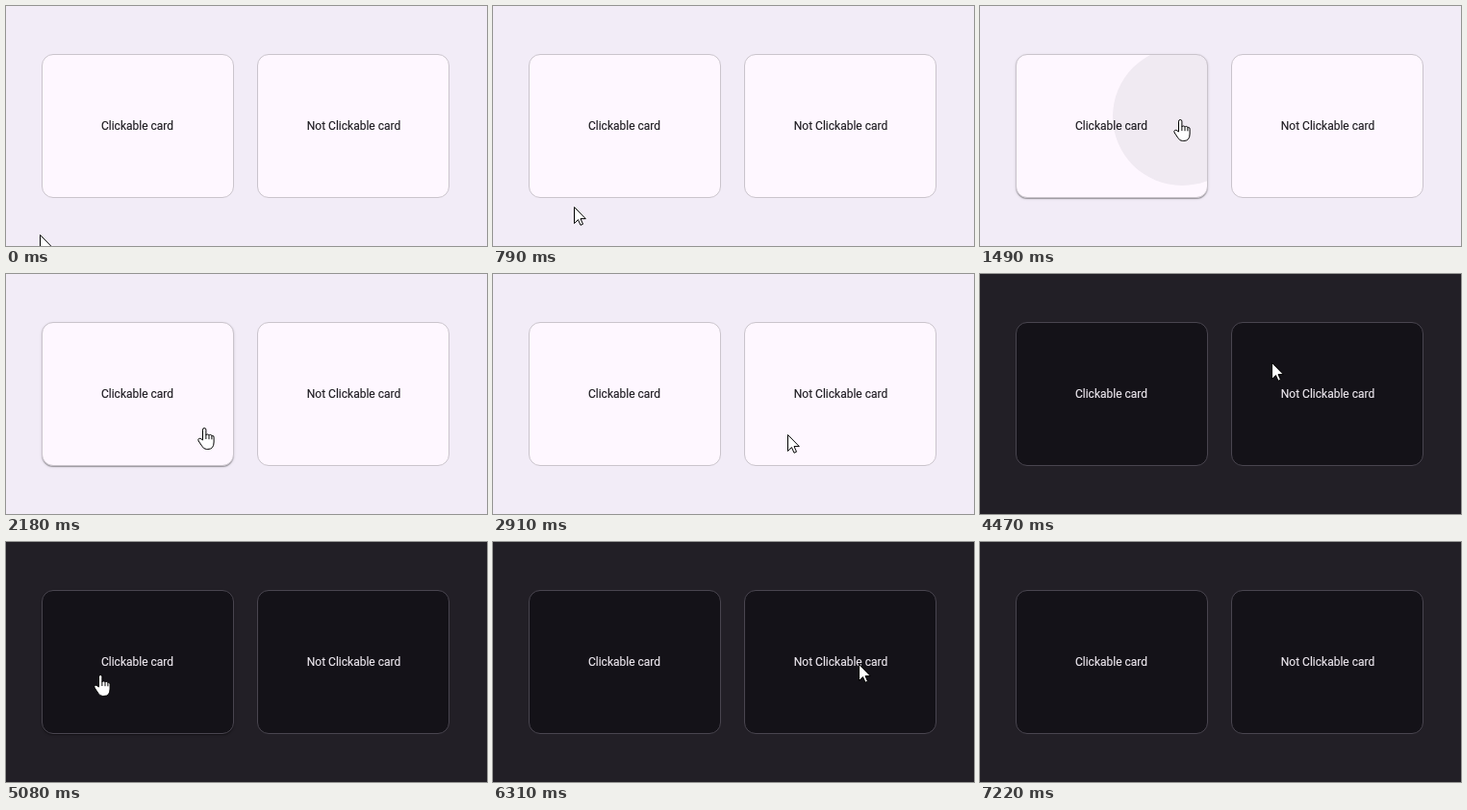
Animation, 500 px wide and 250 px high, one loop 7720 ms. Source, as an HTML page:

```html
<!DOCTYPE html>
<html lang="en">
<head>
<meta charset="utf-8">
<title>Clickable cards</title>
<style>
  html, body { margin: 0; width: 100%; height: 100%; overflow: hidden; }
  body {
    --page: #f2ecf7; --card: #fef7ff; --line: #cac4cc; --ink: #1d1b20;
    position: relative; background: var(--page); color: var(--ink);
    font: 12px/148px Roboto, sans-serif; text-align: center;
    -webkit-text-stroke: .15px;
  }
  body.dark { --page: #221f26; --card: #141218; --line: #49454f; --ink: #eee9f0; }
  .card {
    position: absolute; left: 37px; top: 50px; width: 200px; height: 150px;
    box-sizing: border-box; overflow: hidden; text-indent: -1px;
    background: var(--card); border: 1px solid var(--line); border-radius: 12px;
  }
  .card + .card { left: 261px; text-indent: 1px; }
  .card.hover {
    box-shadow: 0 2px 1px -1px rgba(0,0,0,.2), 0 1px 1px rgba(0,0,0,.14), 0 1px 3px rgba(0,0,0,.12);
  }
  #ripple { position: absolute; border-radius: 50%; background: var(--ink); }
  svg { position: absolute; left: 0; top: 0; }
  path { fill: #fff; stroke: #000; stroke-linejoin: round; }
</style>
</head>
<body>
<div class="card" id="card">Clickable card<div id="ripple"></div></div>
<div class="card">Not Clickable card</div>
<svg width="500" height="250">
  <g id="cursor">
    <path id="arrow" d="M.5 .5V17.5L4.5 13.6 7 19.3 9.5 18.2 7 12.6H12.3z"/>
    <path id="hand" d="M-1.5 13V2.2a1.7 1.7 0 0 1 3.4 0V8q0-1 1.5-1 1.5 0 1.6 1.2.3-.8 1.4-.8 1.3 0 1.5 1.4.3-.5 1.1-.4 1.1.2 1.1 1.8V15q0 7.5-6.3 7.5H2.5q-3 0-4.8-3.3L-5.8 14q-.9-1.7.2-2.4 1.4-.8 2.6.3zM1.9 8v4M5 8.2v4M7.9 8.8v3.5"/>
  </g>
</svg>
<script>
const LOOP = 7720, DARK_AT = 4170;
const GROW = 400, FADE_AT = 380, FADE = 170;

// Each leg eases to its stop; bend bows it vertically, waves 2 makes an S.
const stop = (until, x, y, bend = 0, waves = 1) => ({ until, x, y, bend, waves });
const hold = (until, { x, y }) => stop(until, x, y);
const entry = stop(0, 35, 238);
const below = stop(210, 27, 252);
const press = stop(5080, 98, 138, -52, 2);
const right = stop(5890, 371, 130);
const route = [
  entry, below, hold(370, below),
  stop(1490, 208, 118), stop(2700, 205, 188), stop(2910, 306, 167),
  stop(4080, 408, 135, -108),
  press, hold(5280, press), right, hold(6040, right),
  stop(6310, 380, 127, -25), stop(6800, 106, 172), stop(7060, 100, 252)
];
const clicks = [{ at: 1433, x: 210, y: 115 }, { at: 5280, x: press.x, y: press.y }];

const $ = id => document.getElementById(id);
const clamp = v => Math.min(1, Math.max(0, v));

function pointer(t) {
  const i = route.findIndex(leg => leg.until > t);
  if (i < 0) return route[route.length - 1];
  const from = route[i - 1], to = route[i];
  const u = (t - from.until) / (to.until - from.until);
  const eased = u * u * (3 - 2 * u);
  return {
    x: from.x + (to.x - from.x) * eased,
    y: from.y + (to.y - from.y) * eased + to.bend * Math.sin(Math.PI * to.waves * eased)
  };
}

function drawRipple(t) {
  const click = clicks.find(c => t >= c.at && t < c.at + FADE_AT + FADE);
  const style = $('ripple').style;
  style.display = click ? 'block' : 'none';
  if (!click) return;
  const age = t - click.at;
  const reach = Math.hypot(Math.max(click.x - 37, 237 - click.x),
                           Math.max(click.y - 50, 200 - click.y));
  const r = reach * (1 - (1 - clamp(age / GROW)) ** 3);
  style.left = click.x - 38 - r + 'px';
  style.top = click.y - 51 - r + 'px';
  style.width = style.height = 2 * r + 'px';
  style.opacity = .06 * (1 - clamp((age - FADE_AT) / FADE));
}

function draw(now) {
  const t = now % LOOP;
  const { x, y } = pointer(t);
  const hover = x >= 37 && x < 237 && y >= 50 && y < 200;
  document.body.classList.toggle('dark', t >= DARK_AT);
  $('card').classList.toggle('hover', hover);
  $('cursor').setAttribute('transform', `translate(${Math.round(x)} ${Math.round(y)})`);
  $('arrow').style.display = hover ? 'none' : '';
  $('hand').style.display = hover ? '' : 'none';
  drawRipple(t);
}

const start = performance.now();
function tick() {
  draw(performance.now() - start);
  requestAnimationFrame(tick);
}
tick();
</script>
</body>
</html>
```
